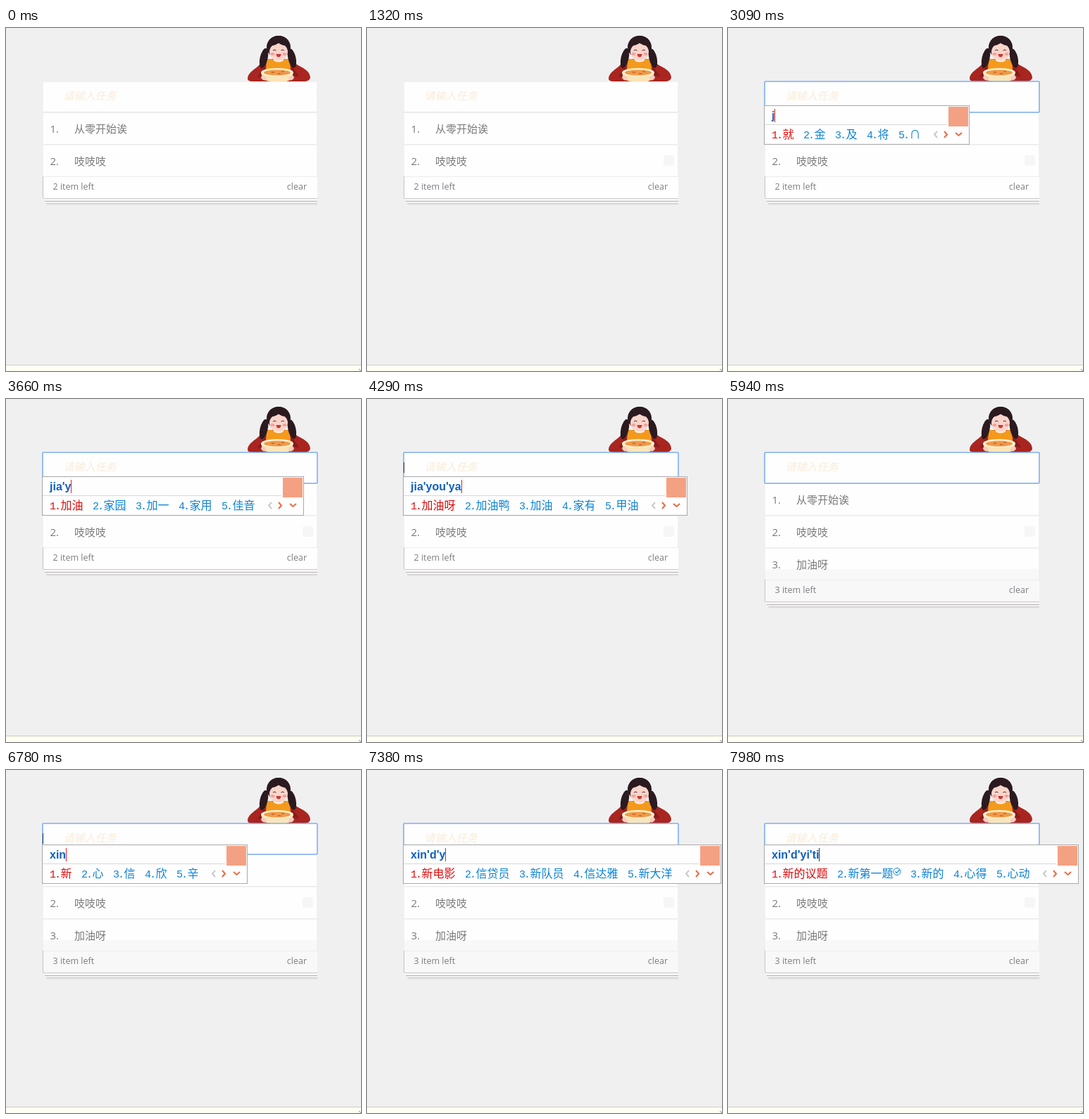
Recreate the animation shown at these times as an HTML page with a canvas. Size 504 by 488 pixels, loop 8000 ms.

```html
<!DOCTYPE html>
<html lang="zh-CN">
<head>
<meta charset="utf-8">
<title>Todo list</title>
<style>
html, body { margin: 0; width: 100%; height: 100%; overflow: hidden; background: #f0f0f0; }
canvas { display: block; }
</style>
</head>
<body>
<canvas id="stage" width="504" height="488"></canvas>
<script>
const ctx = document.getElementById('stage').getContext('2d');
const LOOP = 8000;
const CJK = '"Noto Sans CJK SC", "Noto Sans CJK", sans-serif';
const UI = '"Open Sans", "Noto Sans CJK SC", "Noto Sans CJK", sans-serif';
const MONO = '"Liberation Mono", monospace';
const BOLD = 'bold 16px "Liberation Sans", sans-serif';

// Input method states: start time, typed letters, candidates ('*' adds a badge)
const TYPING = [
  [3090, "j", '就 金 及 将 ∩'],
  [3240, "ji", '及 级 几 机 集'],
  [3420, "jia", '家 加 价 假 架'],
  [3600, "jia'y", '加油 家园 加一 家用 佳音'],
  [3780, "jia'yo", '加油 家有 加哟 甲油 加油哦'],
  [3990, "jia'you", '加油 加油站 家有 甲油 加油哦'],
  [4140, "jia'you'y", '加油呀 加油员 加油鸭 家有一 加油用'],
  [4290, "jia'you'ya", '加油呀 加油鸭 加油 家有 甲油'],
  [4500, ''],
  [6450, "x", '想 像 下 小 西'],
  [6600, "xi", '西 系 洗 喜 细'],
  [6780, "xin", '新 心 信 欣 辛'],
  [7050, "xin'd", '新的 心得 心动 新店 信达'],
  [7290, "xin'd'y", '新电影 信贷员 新队员 信达雅 新大洋'],
  [7500, "xin'd'yi", '新的一 新的 新大衣 心得 新店一'],
  [7800, "xin'd'yi't", '新的一天 新的 新电影 心得 新大衣'],
  [7950, "xin'd'yi'ti", '新的议题 新第一题* 新的 心得 心动']
];

const BLINKS = [[2130, 2640], [3150, 3660], [4170, 4500], [4500, 5010],
                [5430, 5940], [6450, 6960], [7470, 7980]];

function rect(color, x, y, w, h) {
  ctx.fillStyle = color;
  ctx.fillRect(x, y, w, h);
}

function roundRect(color, x, y, w, h, r) {
  ctx.fillStyle = color;
  ctx.beginPath();
  ctx.roundRect(x, y, w, h, r);
  ctx.fill();
}

function oval(color, x, y, rx, ry, turn = 0) {
  ctx.fillStyle = color;
  ctx.beginPath();
  ctx.ellipse(x, y, rx, ry, turn, 0, 7);
  ctx.fill();
}

function shape(color, d) {
  ctx.fillStyle = color;
  ctx.fill(new Path2D(d));
}

function line(color, width, d) {
  ctx.strokeStyle = color;
  ctx.lineWidth = width;
  ctx.stroke(new Path2D(d));
}

function text(str, x, y, font, color, align = 'left') {
  ctx.font = font;
  ctx.fillStyle = color;
  ctx.textAlign = align;
  ctx.fillText(str, x, y);
}

function drawGirl() {
  // sleeves
  shape('#a92520', 'M343 72 C343 63 355 58 360 52 Q366 45 376 44 L398 44 Q408 46 413 52 C419 56 432 60 432 71 Q431 75 425 76 L350 76 Q343 76 343 72Z');
  shape('#861c1c', 'M357 70 Q362 61 368 55 L366 68Z M416 69 Q411 60 405 55 L408 68Z');
  // apron
  shape('#f39a1d', 'M370 44 L377 44 Q387 50 397 44 L403 44 L404 60 L369 60Z');
  shape('#fff0df', 'M378 43 L396 43 L393 47 Q387 50 381 47Z');
  // braids and hair
  oval('#2b1a1f', 366, 43, 5.5, 14.5, 0.22);
  oval('#2b1a1f', 406, 43, 5.5, 14, -0.22);
  oval('#2b1a1f', 387, 27, 17, 16);
  // face with parted fringe
  oval('#f9d5cb', 387, 34, 13, 12.5);
  shape('#2b1a1f', 'M371 33 Q369 12 387 11 Q405 12 403 33 Q400 27 396 25 Q390 24 387 21 Q384 24 378 25 Q374 27 371 33Z');
  oval('#f3a29d', 378.5, 37, 2.8, 2);
  oval('#f3a29d', 395.5, 37, 2.8, 2);
  line('#49272a', 1, 'M379 32 Q381 30 383.5 32 M390.5 32 Q393 30 395 32');
  shape('#c83a37', 'M383.5 37 L390.5 37 Q390 41.5 387 41.5 Q384 41.5 383.5 37Z');
  // bowl and hands
  shape('#fbe4b8', 'M362 63 Q364 76 376 76 L398 76 Q406 75 408 63Z');
  oval('#fff0d0', 385, 63, 23, 6);
  oval('#ee9b49', 385, 63.5, 19, 4);
  oval('#d96532', 379, 63, 2.5, 1);
  oval('#d96532', 388, 65, 2.5, 1);
  oval('#d96532', 393, 62, 2, 1);
  oval('#f7cdbd', 366, 71, 4, 3, 0.6);
  oval('#f7cdbd', 405, 71, 4, 3, -0.6);
}

function drawRow(n, label) {
  const y = 75 + n * 46;
  rect('#fefefe', 53, y, 388, 44);
  rect('#ebebeb', 53, y + 44, 388, 1);
  rect('#f3f3f3', 53, y + 45, 388, 1);
  text(n + '.', 62.5, y + 28, '15px ' + UI, '#7c7979');
  text(label, 97, y + 28, '15px ' + CJK, '#7c7979');
}

function drawFooter(y, count, color) {
  rect(color, 53, y + 1, 389, 30);
  rect('#ececec', 53, y, 389, 1);
  rect('#c2c2c2', 52, y, 1, 31);
  // stacked sheets below
  rect('#cbc9ca', 53, y + 31, 389, 1);
  rect('#f6f6f6', 54, y + 32, 388, 3);
  rect('#b9b3b6', 55, y + 35, 387, 1);
  rect('#f3f3f3', 56, y + 36, 386, 2);
  rect('#d3d3d3', 57, y + 38, 385, 1);
  rect('#dcdcdc', 58, y + 39, 384, 1);
  rect('#e8e8e8', 57, y + 40, 385, 1);
  text(count + ' item left', 66.5, y + 18.5, '12.5px ' + UI, '#7e7c82');
  text('clear', 427, y + 18.5, '12.5px ' + UI, '#7e7c82', 'right');
}

function drawButtons(t) {
  if (t < 810) return;
  const tone = t < 870 ? '#fafafa' : t < 930 ? '#f4f4f4' : t < 1080 ? '#f0f0f0' : '#f6f6f6';
  roundRect(tone, 421, 181, 15, 15, 3);
  if (t >= 1080 && t < 1320) roundRect('#f3f3f3', 421, 135, 15, 15, 3);
}

function drawInput(t) {
  rect('#fefefe', 53, 77, 388, 42);
  rect('#ebebeb', 53, 119, 388, 2);
  const filled = t >= 4500 && t < 5430;
  if (filled) text('加油呀', 52, 103, '13.33px ' + CJK, '#222');
  else text('请输入任务', 81.5, 102, 'italic 15px ' + CJK, '#faebd7');
  if (t >= 2130) {
    ctx.strokeStyle = '#80b1f4';
    ctx.lineWidth = 1.6;
    ctx.beginPath();
    ctx.roundRect(52, 76, 390, 44, 1);
    ctx.stroke();
  }
  if (BLINKS.some(([on, off]) => t >= on && t < off)) rect('#26304a', filled ? 92 : 52, 90 + filled, 1, 15);
}

function drawBadge(x, y) {
  ctx.strokeStyle = '#0c83d5';
  ctx.lineWidth = 1;
  ctx.beginPath();
  ctx.arc(x, y, 5, 0, 7);
  ctx.stroke();
  line('#0c83d5', 1.2, `M${x - 2.5} ${y} l2 2 l4 -4.5`);
}

function drawPopup(t) {
  const state = TYPING.filter(s => t >= s[0]).pop();
  if (!state || !state[1]) return;
  const [, typed, list] = state;
  const top = t < 5000 ? 110 : 106;
  const words = list.split(' ').map(w => ({ label: w.replace('*', ''), badge: w.endsWith('*') }));
  const widths = words.map(w => 16 + w.label.length * 16 + (w.badge ? 11 : 0));
  const right = 62 + widths.reduce((a, b) => a + b) + 52 + 69;

  rect('#fefefe', 51, top, right - 51, 56);
  ctx.strokeStyle = '#a9a9ab';
  ctx.lineWidth = 1;
  ctx.strokeRect(51.5, top + 0.5, right - 52, 55);
  rect('#d8d8d8', 52, top + 27, right - 84, 1);

  text(typed, 62, top + 20, BOLD, '#1160bd');
  const caret = Math.round(62 + ctx.measureText(typed).width);
  rect(t >= 7950 ? '#333' : '#e02020', caret, top + 5, 1, 19);

  let x = 62;
  words.forEach((w, i) => {
    const color = i ? '#0c83d5' : '#df0b0b';
    text(String(i + 1), x, top + 47, '15px ' + MONO, color);
    text('.', x + 7, top + 47, '15px ' + MONO, color);
    text(w.label, x + 15.5, top + 47, '300 16px ' + CJK, color);
    if (w.badge) drawBadge(x + widths[i] - 6, top + 38.5);
    x += widths[i] + 13;
  });

  const y = top + 41;
  line('#c9c9c9', 2, `M${right - 46} ${y - 4} l-4 4.5 l4 4.5`);
  line('#ef6a42', 2, `M${right - 36} ${y - 4} l4 4.5 l-4 4.5`);
  line('#ef6a42', 2, `M${right - 20} ${y - 2} l4.5 4 l4.5 -4`);
  rect('#f4a183', right - 30, top + 2, 28, 28);
}

function draw(t) {
  rect('#f0f0f0', 0, 0, 504, 488);
  rect('#cfcbbf', 0, 479, 504, 1);
  rect('#fffff4', 0, 480, 504, 8);
  line('#8a8a8a', 1, 'M501 485 l3 3');
  drawGirl();
  drawRow(1, '从零开始诶');
  drawRow(2, '吱吱吱');
  if (t < 5430) {
    drawFooter(211, 2, '#fefefe');
  } else {
    drawRow(3, '加油呀');
    // the new row ends in the slightly darker tone of the footer
    ctx.globalCompositeOperation = 'multiply';
    rect('#f9f9f9', 53, 242, 388, 15);
    ctx.globalCompositeOperation = 'source-over';
    drawFooter(257, 3, '#f8f8f8');
  }
  drawButtons(t);
  drawInput(t);
  drawPopup(t);
}

const start = performance.now();
function tick() {
  draw((performance.now() - start) % LOOP);
  requestAnimationFrame(tick);
}
tick();
</script>
</body>
</html>
```
